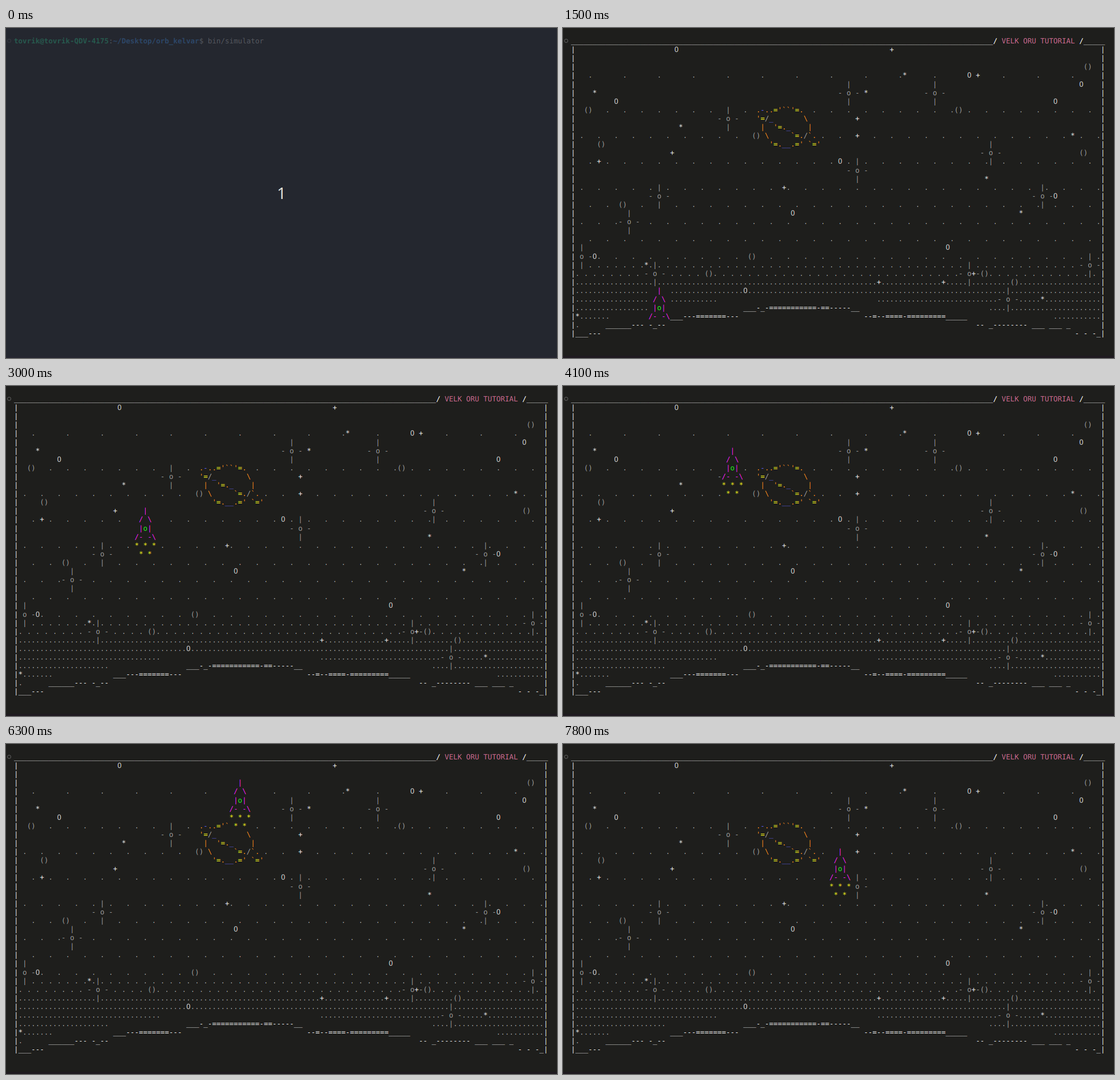
These frames come from a looping animation (966 px wide and 579 px high, 8 s). An HTML page with a canvas:

```html
<!DOCTYPE html>
<html lang="en">
<head>
<meta charset="utf-8">
<title>Terminal flight</title>
<style>
html, body { margin: 0; width: 100%; height: 100%; overflow: hidden; background: #1e1e1c; }
canvas { display: block; }
</style>
</head>
<body>
<canvas id="stage" width="966" height="579"></canvas>
<script>
const ctx = document.getElementById("stage").getContext("2d");
const W = 966, H = 579, LOOP = 8000;
const COLS = 124, ROWS = 35, CELL_W = 7.55, CELL_H = 15.1, LEFT = 14, BASE = 27;
const MONO = '12.54px "DejaVu Sans Mono", monospace';

const PAPER = "#1e1e1c", WHITE = "#f2f2f2", TEXT = "#cccccc", GREY = "#9c9c9c";
const ORANGE = "#ff8700", YELLOW = "#ffff00", BLUE = "#5f5fff", PINK = "#ff00ff", GREEN = "#00ff00";

// Loose objects and ground. ">" jumps to the next tab stop of ten columns, "@" is an asteroid.
const MAP = [
  "",
  ">>    O>>>>>    +",
  "",
  ">>>>>>>>>>>         ()",
  ">>>>>>>       *>>  O +",
  ">>>>>>>>>>>        O",
  "     *>>>>>>    @   *>>    @",
  ">O>>>>>>>>>>  O",
  "   ()>>>>>>>>         ()",
  ">>>      @>>>      +",
  ">>     *",
  ">>>>  ()>>      +>>>>>      *",
  "      ()",
  ">>   +>>>>>>>       @>>        ()",
  "      +>>>>>>  O",
  ">>>>>>      @",
  ">>>>>>>>>      *",
  ">>>>         +",
  ">>@>>>>>>>>         @  O",
  "> ()",
  ">>>>> O>>>>>    *",
  ">   @",
  "",
  "",
  ">>>>>>>>       O",
  "  @  O>>>> ()",
  ">       *>>>>>>>>>>>@",
  ">         @> ()>>>>>>  @+ ()",
  ">>>>>>> +>      +>>  ()",
  ">>>>O",
  ">>>>>>>>>> @       *",
  ">>>>___-_-===========-==-----__",
  " *>>   ___---=======--->>>        --=--====-=========_____",
  "        ______--- -_-->>>>>>>    -- _-------- ___ ___ _",
  " ___--->>>>>>>>>>>       - - -_"
];

const PLANET = [
  ".-..='``'=.",
  "'=/_       \\",
  " |  '=._    |",
  "  \\     `=./`.",
  "   '=.__.=' `='"
];

const SHIP = ["  |  ", " / \\ ", " |o| ", "/- -\\"];
const FLAMES = ["* * *", " * * "];

const mapInk = ch => "()".includes(ch) ? GREY : ch === "O" ? TEXT : WHITE;
const planetInk = ch => ({ "=": YELLOW, "_": BLUE, "-": BLUE, "/": GREY })[ch] || ORANGE;
const shipInk = ch => ({ "o": GREEN, "*": YELLOW })[ch] || PINK;

function put(grid, c, r, text, ink, bold = false) {
  [...text].forEach((ch, i) => {
    grid[r][c + i] = { ch, bold, ink: typeof ink === "function" ? ink(ch) : ink };
  });
}

function dots(grid, r, from, to, step = 1) {
  for (let c = from; c <= to; c += step) put(grid, c, r, ".", GREY);
}

// Dot rows get denser toward the bottom, where the ground cuts them off.
function field(grid) {
  dots(grid, 4, 4, 120, 8);
  [8, 11, 14, 17, 19, 21, 23, 25].forEach((r, i) => dots(grid, r, i % 2 ? 2 : 4, 122, 4));
  dots(grid, 26, 4, 122, 2);
  dots(grid, 27, 1, 122, 2);
  dots(grid, 28, 1, 122);
  dots(grid, 29, 1, 122);
  [71, 97, 112, 123].forEach((right, i) => {
    dots(grid, 30 + i, 1, Math.max(1, Math.round(33 - 12.5 * i)));
    dots(grid, 30 + i, right, 122);
  });
}

function asteroid(grid, c, r) {
  put(grid, c, r - 1, "|", GREY);
  put(grid, c - 2, r, "- o -", GREY);
  put(grid, c, r + 1, "|", GREY);
}

function objects(grid) {
  MAP.forEach((line, r) => {
    let c = 0;
    for (const ch of line) {
      if (ch === ">") {
        c = (Math.floor(c / 10) + 1) * 10;
        continue;
      }
      if (ch === "@") asteroid(grid, c, r);
      else if (ch !== " ") put(grid, c, r, ch, mapInk);
      c++;
    }
  });
}

function frameLines(grid) {
  for (let r = 1; r < ROWS; r++)
    for (const c of [0, COLS - 1]) put(grid, c, r, "|", WHITE);
  put(grid, 0, 0, "_".repeat(COLS), WHITE);
  put(grid, 98, 0, "/ ", WHITE, true);
  put(grid, 100, 0, "VELK ORU TUTORIAL", "#d06a90");
  put(grid, 117, 0, " /", WHITE, true);
}

function buildScene() {
  const grid = Array.from({ length: ROWS }, () => Array(COLS).fill(null));
  field(grid);
  objects(grid);
  PLANET.forEach((text, i) => put(grid, 43, 8 + i, text, planetInk));
  // The two loose spots right of the planet and the rock left of it
  put(grid, 42, 11, "()", GREY);
  put(grid, 58, 11, ".", GREY);
  frameLines(grid);
  return grid;
}

// One column per tick; height follows a parabola.
function drawShip(grid, tick) {
  const top = Math.round(2.3 + 0.0377 * (tick - 26.6) ** 2);
  const rows = tick > 0 ? SHIP.concat(FLAMES) : SHIP;
  rows.forEach((text, i) => put(grid, 18 + tick, top + i, text, shipInk));
}

const channels = hex => [1, 3, 5].map(i => parseInt(hex.slice(i, i + 2), 16));

// Subpixel text: red, green and blue are each drawn a third of a pixel apart.
function inkText(text, x, y, ink, paper = PAPER) {
  const from = channels(paper);
  ctx.globalCompositeOperation = "lighter";
  channels(ink).forEach((value, k) => {
    const light = [0, 0, 0];
    light[k] = Math.max(0, value - from[k]);
    if (!light[k]) return;
    ctx.fillStyle = `rgb(${light})`;
    ctx.fillText(text, x + (1 - k) / 3, y);
  });
  ctx.globalCompositeOperation = "source-over";
}

function write(ch, c, r, ink, bold) {
  ctx.font = (bold ? "bold " : "") + MONO;
  inkText(ch, LEFT + c * CELL_W, Math.round(BASE + r * CELL_H), ink);
}

function drawGrid(grid) {
  grid.forEach((row, r) => row.forEach((cell, c) => {
    if (cell && cell.ch !== " ") write(cell.ch, c, r, cell.ink, cell.bold);
  }));
}

function drawBase() {
  ctx.textRendering = "geometricPrecision";
  ctx.fillStyle = PAPER;
  ctx.fillRect(0, 0, W, H);
  ctx.fillStyle = "#1f1a20";
  ctx.fillRect(0, 575, W, 4);
  ctx.strokeStyle = "#6a6a6a";
  ctx.lineWidth = 1;
  ctx.beginPath();
  ctx.arc(5.5, 22.5, 3, 0, Math.PI * 2);
  ctx.stroke();
}

function drawPrompt() {
  const line = [[]];
  const add = (text, ink, bold) => put(line, line[0].length, 0, text, ink, bold);
  add("tovrik@tovrik-QDV-4175", "#23d18b", true);
  add(":", TEXT);
  add("~/Desktop/orb_kelvar", "#3b8eea", true);
  add("$ bin/simulator", TEXT);
  drawGrid(line);
}

function drawCountdown() {
  ctx.fillStyle = "rgba(40, 44, 54, 0.72)";
  ctx.fillRect(0, 0, W, H);
  ctx.font = '28px "Noto Sans", "Open Sans", sans-serif';
  ctx.textAlign = "center";
  inkText("1", W / 2, 300, "#e4e4dc", "#25282f");
  ctx.textAlign = "left";
}

const scene = buildScene();

function drawFlight(tick) {
  const grid = scene.map(row => row.slice());
  drawShip(grid, tick);
  drawGrid(grid);
}

// -2: countdown, -1: prompt, 0 and up: flight ticks
function stateAt(t) {
  if (t < 100) return -2;
  if (t < 1500) return -1;
  const u = t - 1500;
  return 2 * Math.floor(u / 300) + (u % 300 >= 200 ? 1 : 0);
}

let shown = null;
function frame() {
  const state = stateAt(performance.now() % LOOP);
  if (state !== shown) {
    shown = state;
    drawBase();
    if (state < 0) drawPrompt();
    else drawFlight(state);
    if (state === -2) drawCountdown();
  }
  requestAnimationFrame(frame);
}
frame();
</script>
</body>
</html>
```
